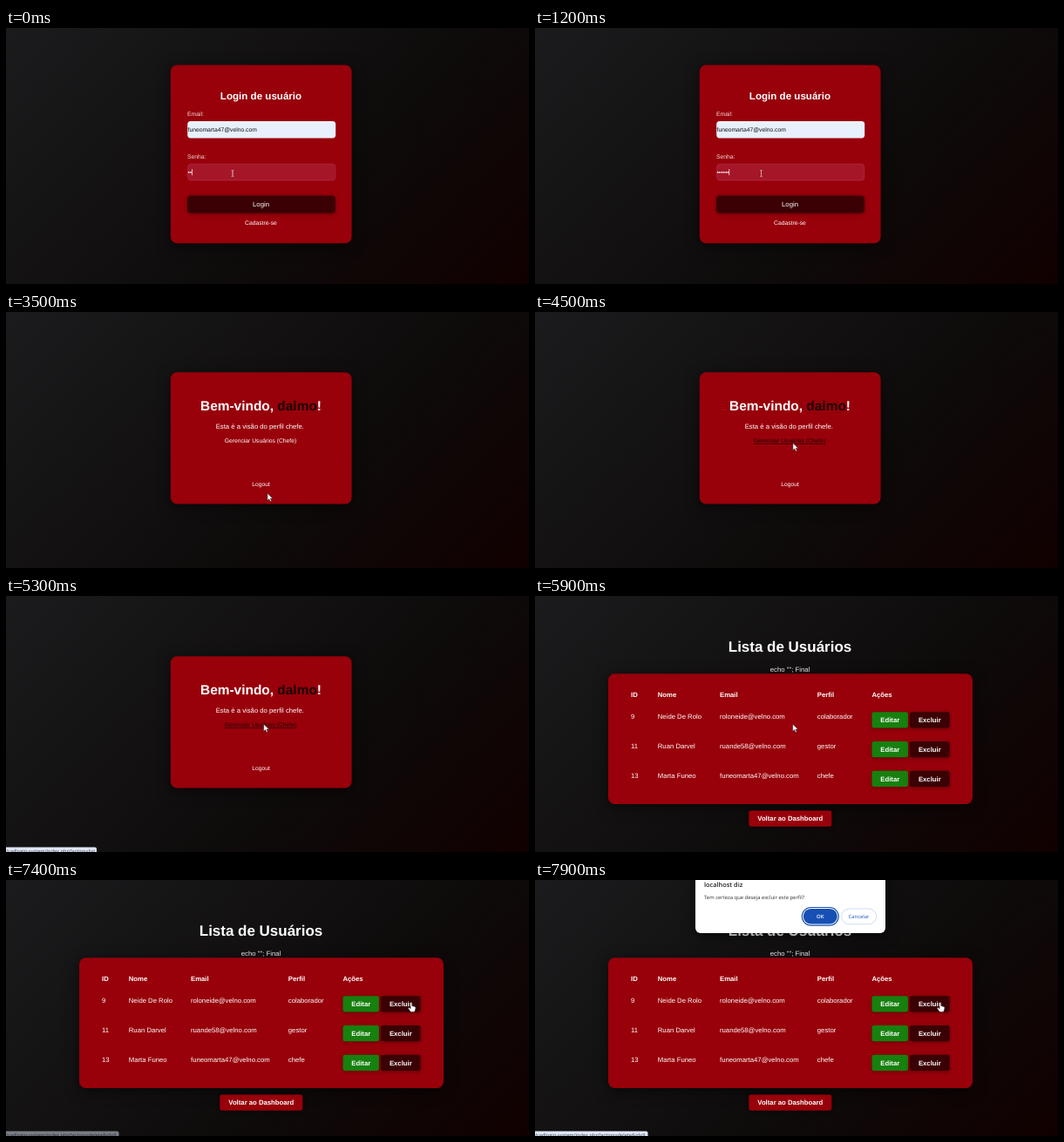
Write an HTML page that moves like this. It is 600 px wide and 294 px high and loops after 8000 ms.

```html
<!DOCTYPE html>
<html lang="pt-BR">
<head>
<meta charset="utf-8">
<title>Login de usuário</title>
<style>
html, body { margin: 0; width: 100%; height: 100%; overflow: hidden; }
body { background: linear-gradient(135deg, #1b1b1d, #0e0b0b 60%, #110000); }
svg { display: block; width: 600px; height: 294px; }
text { font-family: "Liberation Sans", Arial, sans-serif; text-rendering: geometricPrecision; white-space: pre; }
.ui text { font-family: "Open Sans", "Noto Sans", sans-serif; }
.card { filter: drop-shadow(0 3px 8px rgba(0, 0, 0, .55)); }
.btn { filter: drop-shadow(0 1px 2px rgba(0, 0, 0, .35)); }
</style>
</head>
<body>
<svg id="stage" viewBox="0 0 600 294"></svg>
<script>
const LOOP = 8000;
const RED = '#98000a', DARK = '#3a0004', GREEN = '#17800f';
const SMALL = 6.755, BASE = 7.72, MID = 292.5;

const rect = (x, y, w, h, r, fill, extra = '') =>
  `<rect x="${x}" y="${y}" width="${w}" height="${h}" rx="${r}" fill="${fill}" ${extra}/>`;
const text = (str, x, y, size, extra = '', fill = '#fff') =>
  `<text x="${x}" y="${y}" font-size="${size}" fill="${fill}" ${extra}>${str}</text>`;
const group = (id, body, extra = '') => `<g id="${id}" ${extra}>${body}</g>`;
const card = (x, y, w, h) => rect(x, y, w, h, 7.5, RED, 'class="card"');
const BOLD = 'font-weight="700"', CENTER = 'text-anchor="middle"';
const button = (label, x, y, w, fill) =>
  rect(x, y, w, 18.3, 2.4, fill, 'class="btn"') +
  text(label, x + w / 2, y + 11.9, BASE, `${BOLD} ${CENTER}`);

const login =
  card(188.8, 42.5, 207.8, 204.8) +
  text('Login de usuário', MID, 82, 11.58, `${BOLD} ${CENTER}`) +
  text('Email:', 208, 101, SMALL, '', '#f2dcdd') +
  rect(208.2, 107, 170, 19.4, 3.6, '#e8f0fe') +
  text('funeomarta47@velno.com', 208.5, 119, SMALL, '', '#111') +
  text('Senha:', 208, 150, SMALL, '', '#f2dcdd') +
  rect(208.6, 156.2, 169.2, 18.8, 3.6, '#a51628', 'stroke="#b5364a" stroke-width=".6"') +
  text('', 208.5, 168, SMALL, 'id="dots"') +
  rect(0, 162, .7, 7.2, 0, '#fff', 'id="caret"') +
  rect(208, 192.6, 169.8, 20, 3.8, DARK, 'class="btn"') +
  text('Login', MID, 205.2, BASE, CENTER) +
  text('Cadastre-se', MID, 226.2, SMALL, CENTER);

const welcome =
  card(188.8, 69.2, 207.8, 151.2) +
  text('Bem-vindo, <tspan fill="#1b0306">dalmo</tspan>!', MID, 113, 15.44, `${BOLD} ${CENTER}`) +
  text('Esta é a visão do perfil chefe.', 240.7, 134, BASE) +
  text('Gerenciar Usuários (Chefe)', 250.7, 150, SMALL, 'id="link"') +
  text('Logout', MID, 199.8, SMALL, CENTER);

const columns = [110, 140.8, 212, 323.8, 386.5];
const users = [
  ['9', 'Neide De Rolo', 'roloneide@velno.com', 'colaborador'],
  ['11', 'Ruan Darvel', 'ruande58@velno.com', 'gestor'],
  ['13', 'Marta Funeo', 'funeomarta47@velno.com', 'chefe']
];
const list =
  text('Lista de Usuários', MID, 64.3, 16.98, `${BOLD} ${CENTER}`) +
  text('echo ""; Final', MID, 87, BASE, CENTER) +
  card(84, 89.2, 418, 149.8) +
  ['ID', 'Nome', 'Email', 'Perfil', 'Ações']
    .map((h, i) => text(h, columns[i], 115.6, BASE, BOLD)).join('') +
  users.map((user, row) => {
    const y = 33.8 * row;
    return user.map((v, i) => text(v, columns[i], 141.3 + y, BASE)).join('') +
      button('Editar', 386.5, 133.2 + y, 41.5, GREEN) +
      button('Excluir', 430, 133.2 + y, 45.6, DARK);
  }).join('') +
  button('Voltar ao Dashboard', 245.3, 246.4, 95, RED);

const status =
  rect(-4, 288.4, 10, 10, 2, '#dfe7f5', 'id="bar"') +
  text('', 0, 294.6, 5.65, 'id="url"', '#3c4658');

const dialog =
  rect(184, -20, 218, 81, 6, '#fff', 'class="card"') +
  text('localhost diz', 194, 8.2, 7.37, 'font-weight="600"', '#222') +
  text('Tem certeza que deseja excluir este perfil?', 194, 22.3, 5.9, '', '#333') +
  rect(306.3, 31.5, 42, 20.6, 10.3, '#fff', 'stroke="#174ea6" stroke-width="1.1"') +
  rect(307.8, 33, 39, 17.6, 8.8, '#1650b4') +
  text('OK', 327.3, 44, 5.9, `font-weight="600" ${CENTER}`) +
  rect(351.6, 33, 40, 17.8, 8.9, '#fff', 'stroke="#b9cdf3" stroke-width=".7"') +
  text('Cancelar', 371.5, 44, 5.9, CENTER, '#1a56c4');

const cursor =
  '<path id="beam" d="M-1.5-3.6h1q.5 0 .5.6v6q0 .6-.5.6h-1M1.5-3.6h-1q-.5 0-.5.6v6q0 .6.5.6h1" fill="none" stroke="#d8b4b8" stroke-width=".7"/>' +
  '<path id="arrow" d="M0 0v8.2l1.9-1.8 1.3 3 1.4-.6-1.3-2.9h2.6z" fill="#fff" stroke="#222" stroke-width=".5"/>' +
  '<path id="hand" d="M-.9.8q.9-1.6 1.8 0v3.2l3.2.8q1 .3.9 1.5l-.6 2.6-.9 2h-4.2l-2.9-4q-.3-1.2 1-1l1.7 1.3z" fill="#fff" stroke="#222" stroke-width=".5"/>';

document.getElementById('stage').innerHTML =
  group('login', login) + group('welcome', welcome) + group('list', list) +
  group('status', status, 'class="ui"') + group('dialog', dialog, 'class="ui"') +
  group('cursor', cursor);

const $ = id => document.getElementById(id);
const show = (id, on) => $(id).setAttribute('display', on ? 'inline' : 'none');
const clamp = v => Math.min(1, Math.max(0, v));

// time, x, y
const path = [
  [0, 260, 167], [2400, 259, 167], [2650, 259, 167], [3050, 300, 208.3],
  [3900, 300, 208.3], [4600, 295.7, 147.2], [6300, 295.7, 147.2],
  [7150, 465, 140.6], [LOOP, 465, 140.6]
];
function pointer(t) {
  const i = path.findIndex(p => p[0] > t);
  const [t0, x0, y0] = path[i - 1], [t1, x1, y1] = path[i];
  const u = (t - t0) / (t1 - t0), e = u * u * (3 - 2 * u);
  return [x0 + (x1 - x0) * e, y0 + (y1 - y0) * e];
}

function draw(t) {
  const page = t < 3200 ? 'login' : t < 5400 ? 'welcome' : 'list';
  ['login', 'welcome', 'list'].forEach(id => show(id, id === page));

  const count = Math.min(10, 2 + Math.floor(t / 285));
  $('dots').textContent = '•'.repeat(count);
  $('caret').setAttribute('x', 208.3 + count * SMALL * .35);

  const [x, y] = pointer(t);
  const hover = page === 'welcome' && y < 152;
  $('link').setAttribute('fill', hover ? '#1b0306' : '#fff');
  $('link').setAttribute('text-decoration', hover ? 'underline' : 'none');

  const deleting = t > 7000;
  $('bar').setAttribute('width', deleting ? 133.5 : 108);
  $('url').textContent = '/cadlogin-system/index.php?action=' + (deleting ? 'delete&id=9' : 'list');
  $('status').setAttribute('opacity',
    deleting ? clamp((t - 7300) / 200) : clamp((t - 4700) / 200) * clamp((5600 - t) / 150));

  show('dialog', t >= 7700);
  const shape = page === 'login' && y < 176 ? 'beam' : page === 'list' && x > 430 ? 'hand' : 'arrow';
  ['beam', 'arrow', 'hand'].forEach(id => show(id, id === shape));
  $('cursor').setAttribute('transform', `translate(${x} ${y})`);
}

const start = performance.now();
function tick() {
  draw((performance.now() - start) % LOOP);
  requestAnimationFrame(tick);
}
tick();
</script>
</body>
</html>
```
